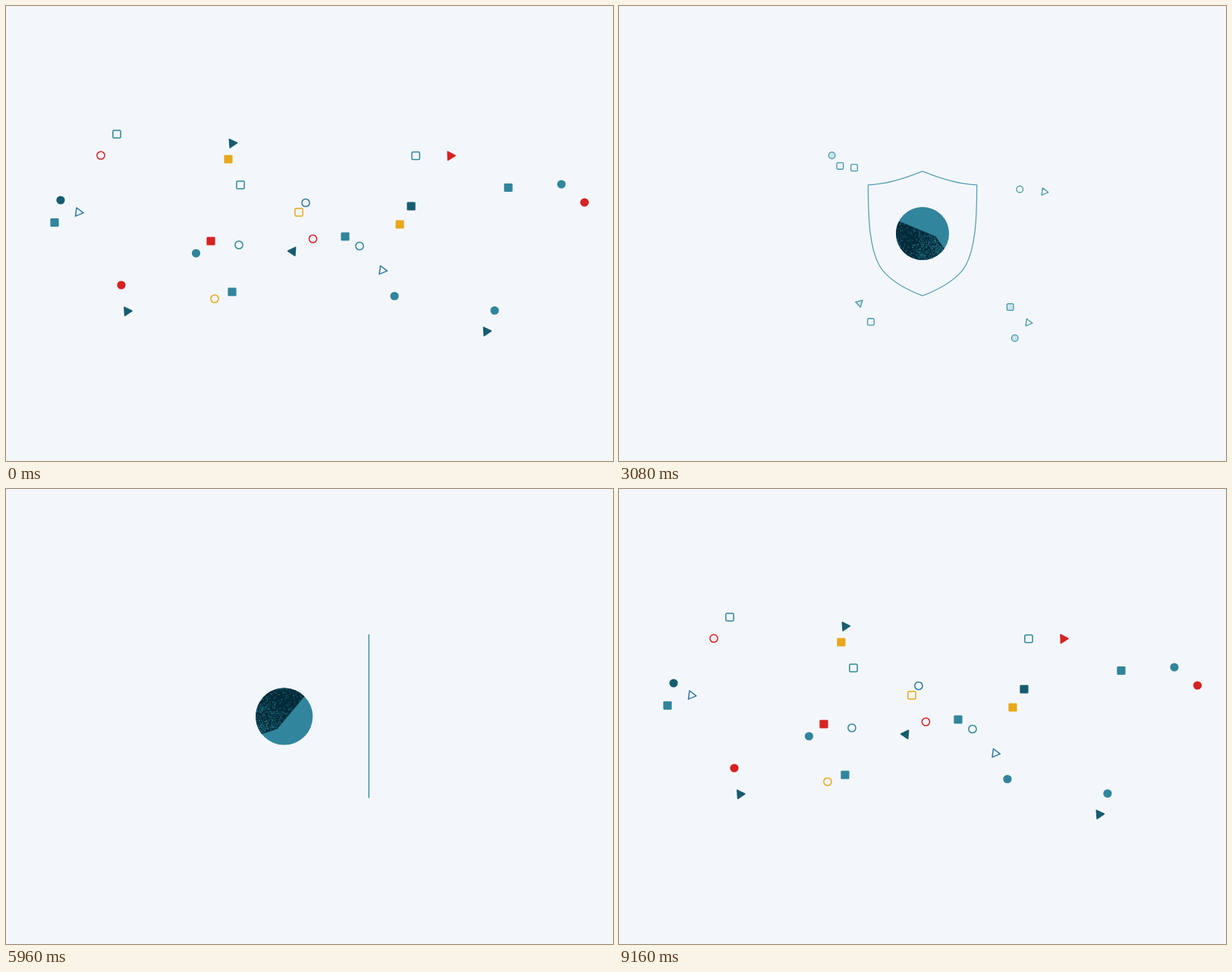
These frames come from a looping animation (800 px wide and 600 px high, 9200 ms). An HTML page with a canvas:

```html
<!DOCTYPE html>
<html lang="en">
<head>
<meta charset="utf-8">
<title>Shapes and shield</title>
<style>
  html, body { margin: 0; width: 100%; height: 100%; overflow: hidden; background: #f3f7fc; }
  canvas { display: block; width: 800px; height: 600px; }
</style>
</head>
<body>
<canvas id="stage" width="800" height="600"></canvas>
<script>
const LOOP = 9200, TAU = Math.PI * 2, RAD = Math.PI / 180;
const BG = '#f3f7fc', TEAL = '#31859c', DARK = '#175c70', RED = '#d82121',
      GOLD = '#e8a81c', BLUE = '#2f78a0', MINT = '#addedf', PALE = '#cbe3ec', INK = '#4596ac';
const ctx = document.getElementById('stage').getContext('2d');

const clamp = (v, a = 0, b = 1) => Math.min(b, Math.max(a, v));
const part = (t, a, b) => clamp((t - a) / (b - a));
const mix = (a, b, p) => a + (b - a) * p;
const smooth = p => p * p * (3 - 2 * p);
const outQuad = p => 1 - (1 - p) ** 2;
const outCubic = p => 1 - (1 - p) ** 3;
const inOut = p => p < .5 ? 4 * p ** 3 : 1 - (2 - 2 * p) ** 3 / 2;

// Resting places of the loose shapes, grouped by look.
const field = [
  { kind: 'square', fill: TEAL, at: [[298, 377], [447, 304], [662, 239.5], [64, 285.5]] },
  { kind: 'square', fill: GOLD, at: [[293, 202], [519, 288]] },
  { kind: 'square', fill: RED, at: [[270, 310]] },
  { kind: 'square', fill: DARK, at: [[534, 264]] },
  { kind: 'square', line: TEAL, at: [[146, 169], [309, 236], [540, 197.5]] },
  { kind: 'square', line: GOLD, at: [[386, 272]] },
  { kind: 'circle', fill: TEAL, at: [[250.5, 326], [512, 382.5], [644, 401.5], [732, 235]] },
  { kind: 'circle', fill: DARK, at: [[72, 256]] },
  { kind: 'circle', fill: RED, at: [[152, 368], [762.5, 259]] },
  { kind: 'circle', line: TEAL, at: [[307, 315], [466, 316.5]] },
  { kind: 'circle', line: BLUE, at: [[395, 259.5]] },
  { kind: 'circle', line: RED, at: [[125, 197], [404.5, 307]] },
  { kind: 'circle', line: GOLD, at: [[275, 386]] },
  { kind: 'triangle', fill: DARK, angle: -4, at: [[298, 181], [159.5, 402.5], [633, 429]] },
  { kind: 'triangle', fill: DARK, angle: 184, at: [[378, 323.5]] },
  { kind: 'triangle', fill: RED, angle: -2, at: [[585.5, 197.5]] },
  { kind: 'triangle', line: BLUE, angle: 8, at: [[95.5, 272], [496, 348.5]] }
];
const sparks = [
  { kind: 'circle', fill: PALE, at: [[272, 189.5], [530.5, 448]] },
  { kind: 'circle', at: [[537.5, 237.5]] },
  { kind: 'square', fill: PALE, at: [[524, 404]] },
  { kind: 'square', at: [[283.5, 204.5], [303.5, 207], [327, 425]] },
  { kind: 'triangle', fill: PALE, angle: 76, at: [[311, 398.5]] },
  { kind: 'triangle', angle: 8, at: [[572, 241], [549.5, 426]] }
];

function trace(kind, x, y, r, angle = 0) {
  ctx.beginPath();
  if (kind === 'circle') ctx.arc(x, y, r, 0, TAU);
  else if (kind === 'square') ctx.roundRect(x - r, y - r, 2 * r, 2 * r, 1.4);
  else {
    for (let i = 0; i < 3; i++) {
      const a = (angle + i * 120) * RAD;
      ctx.lineTo(x + r * Math.cos(a), y + r * Math.sin(a));
    }
    ctx.closePath();
  }
}

function paint(fill, stroke, width) {
  if (fill) { ctx.fillStyle = fill; ctx.fill(); }
  if (stroke) {
    ctx.strokeStyle = stroke;
    ctx.lineWidth = width;
    ctx.lineJoin = 'round';
    ctx.stroke();
  }
}

// Order of leaving: round fills on the left, then cool fills, warm fills, outlines.
function fadeLevel({ kind, fill, line }, x) {
  if (line) return line === GOLD ? .25 : 1.6;
  if (kind === 'circle' && x < 300) return .08;
  const bold = kind !== 'triangle' && fill !== TEAL;
  return bold ? .95 : .6;
}

function drawField(t, edge) {
  const entering = t > 7120;
  if (!entering && t > 2040) return;
  const decay = at => Math.exp((7880 - at) / 317);
  const pull = decay(t) - decay(LOOP);
  const drift = smooth(part(t, 0, 1800));
  ctx.save();
  if (entering && t < 8250) {
    ctx.beginPath();
    ctx.rect(edge, 0, 800 - edge, 600);
    ctx.clip();
  }
  for (const group of field) {
    const { kind, fill, line, angle, at } = group;
    const r = kind === 'triangle' ? 6.5 : fill ? 5.6 : 5.1;
    for (const [x, y] of at) {
      const dx = entering ? -(24 + .035 * x) * pull : -(4 + .02 * x) * drift;
      const dy = entering ? .055 * (315 - y) * pull : .03 * (340 - y) * drift;
      ctx.globalAlpha = entering ? 1 : clamp(fadeLevel(group, x) - (t - 1800) / 130);
      trace(kind, x + dx, y + dy, r, angle);
      paint(fill, line || (kind === 'triangle' && fill), 1.5);
    }
  }
  ctx.restore();
}

// Stipple points in the unit disc, denser at the rim and at one end of the shadow.
let seed = 71;
const rand = () => (seed = seed * 16807 % 2147483647) / 2147483647;
const grain = [];
for (let i = 0; i < 2600; i++) {
  const r = Math.sqrt(rand()), a = rand() * TAU;
  const x = r * Math.cos(a), y = r * Math.sin(a);
  const near = clamp(1 - Math.hypot(x - .1, y - .9) / 1.15);
  if (rand() < .1 + .7 * near + .2 * r ** 6) grain.push([x, y]);
}

function drawBall(t, x, r) {
  const turn = t < 5960 ? (t - 4160) / 1800 * 67 : 67 + (t - 5960) / 1160 * 52;
  const fold = smooth(part(t, 5960, 7120));
  trace('circle', x, 300, r);
  paint(TEAL);
  ctx.save();
  ctx.translate(x, 300);
  ctx.rotate(turn * RAD);
  ctx.beginPath();
  ctx.arc(0, 0, r, 75 * RAD, 248 * RAD);
  ctx.lineTo(r * mix(.31, -.12, fold), r * mix(.4, .07, fold));
  ctx.closePath();
  paint('#032a39');
  ctx.clip();
  ctx.fillStyle = '#206b7c';
  for (const [gx, gy] of grain) ctx.fillRect(gx * r - .55, gy * r - .55, 1.1, 1.1);
  ctx.restore();
}

function drawDisc(t, x, r) {
  const size = 33 * outCubic(part(t, 3300, 3900)) * (1 - smooth(part(t, 4900, 5300)));
  if (size < .1) return;
  trace('circle', 434, 278, size);
  paint(MINT);
  ctx.save();
  trace('circle', x, 300, r);
  ctx.clip();
  trace('circle', 434, 278, size);
  paint(BG);
  ctx.restore();
}

function drawShield(t) {
  const alpha = 1 - part(t, 5150, 5500);
  if (t < 2400 || !alpha) return;
  ctx.save();
  ctx.globalAlpha = alpha;
  ctx.translate(400, 0);
  ctx.beginPath();
  for (const side of [1, -1]) {
    ctx.moveTo(0, 217.8);
    ctx.quadraticCurveTo(42 * side, 235, 71.6 * side, 235.8);
    ctx.bezierCurveTo(71.6 * side, 280, 70 * side, 318, 57 * side, 342);
    ctx.quadraticCurveTo(44 * side, 365, 0, 382.2);
  }
  const drawn = smooth(part(t, 2400, 3100));
  if (drawn < 1) ctx.setLineDash([260 * drawn, 300]);
  paint(0, '#5a9fb3', 1.3);
  ctx.restore();
}

function drawSparks(t) {
  const alpha = part(t, 2320, 2500) * (1 - part(t, 5250, 5500));
  if (!alpha) return;
  const s = (1 + .06 * (t - 4160) / 960) * outCubic(part(t, 2320, 3000));
  ctx.save();
  ctx.globalAlpha = alpha;
  for (const { kind, fill, angle, at } of sparks) {
    for (const [x, y] of at) {
      trace(kind, mix(400, x, s), mix(300, y, s), kind === 'triangle' ? 5.5 : 4.3, angle);
      paint(fill, INK, 1.3);
    }
  }
  ctx.restore();
}

function lineX(t, spread) {
  if (t < 6865) return mix(457, 497.5, spread);
  return mix(497.5, 42, inOut(part(t, 6865, 7900))) - 11 * smooth(part(t, 7900, 8250));
}

function drawLine(t, x) {
  const grow = outQuad(part(t, 5500, 6120));
  const alpha = 1 - part(t, 7950, 8250);
  if (!grow || !alpha) return;
  const half = 115 * grow;
  const width = 1.2 + 1.6 * part(t, 5900, 6700) * (1 - part(t, 7200, 7850));
  ctx.save();
  ctx.globalAlpha = alpha;
  ctx.beginPath();
  ctx.moveTo(x, 299.5 - half);
  ctx.lineTo(x, 299.5 + half);
  ctx.lineCap = 'round';
  paint(0, TEAL, width);
  ctx.restore();
}

function draw(t) {
  ctx.globalAlpha = 1;
  ctx.fillStyle = BG;
  ctx.fillRect(0, 0, 800, 600);
  const spread = inOut(part(t, 5300, 6600));
  const edge = lineX(t, spread);
  drawField(t, edge);
  drawSparks(t);
  drawShield(t);
  if (t > 2320 && t < 7900) {
    const x = mix(400, 336.5, spread) + 125 * part(t, 6850, 7900) ** 2;
    const r = (35 + 5 * spread) * outCubic(part(t, 2320, 2850));
    ctx.save();
    if (t > 6850) {
      ctx.beginPath();
      ctx.rect(0, 0, edge, 600);
      ctx.clip();
    }
    drawBall(t, x, r);
    drawDisc(t, x, r);
    ctx.restore();
  }
  drawLine(t, edge);
}

const start = performance.now();
function tick() {
  draw((performance.now() - start) % LOOP);
  requestAnimationFrame(tick);
}
tick();
</script>
</body>
</html>
```
